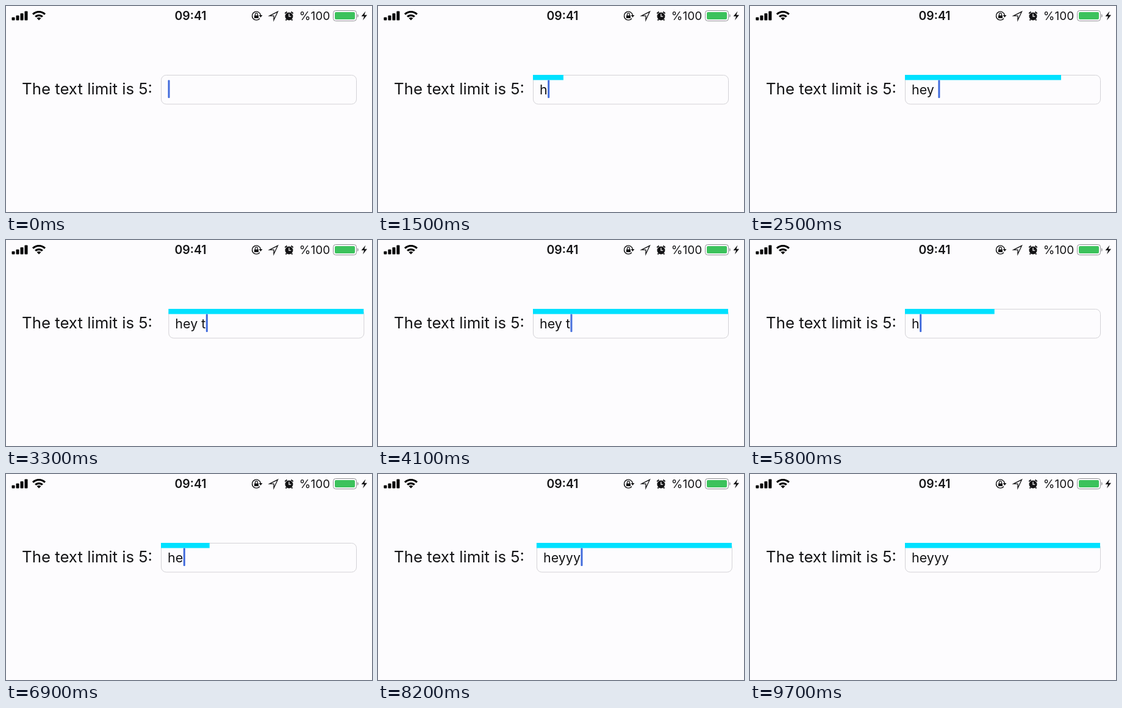
These frames come from a looping animation (600x338 px, 9.8 s). An HTML page with a canvas:

```html
<!DOCTYPE html>
<html lang="en">
<head>
<meta charset="utf-8">
<style>
  html, body { margin: 0; width: 100%; height: 100%; overflow: hidden; background: #fdfcfe; }
  canvas { display: block; }
</style>
</head>
<body>
<canvas id="stage" width="600" height="338"></canvas>
<script>
const ctx = document.getElementById('stage').getContext('2d');
const LOOP = 9800, CHAR_W = 64, GROW = 360;
const BG = '#fdfcfe', INK = '#141416', FAMILY = 'Inter, "Open Sans", sans-serif';

// [time, text after the key press]
const keys = [
  [1250, 'h'], [1600, 'he'], [1950, 'hey'], [2140, 'hey '], [2680, 'hey t'],
  [4480, 'hey '], [4720, 'hey'], [5570, 'he'], [5800, 'h'], [6030, ''],
  [6580, 'h'], [6776, 'he'], [7060, 'hey'], [7320, 'heyy'], [7630, 'heyyy']
];
// Key presses refused because the limit is reached
const refused = [3290, 3620, 8102, 8602, 8802];
const popup = [4780, 5380];

const clamp = x => Math.max(0, Math.min(1, x));
const ease = x => { x = clamp(x); return x * x * (3 - 2 * x); };

function barWidth(t) {
  let width = 0, count = 0;
  for (const [at, text] of keys) {
    width += (text.length - count) * CHAR_W * ease((t - at) / GROW);
    count = text.length;
  }
  return width;
}

function shake(t) {
  const at = refused.filter(x => x <= t).pop();
  const dx = at === undefined ? 0 : 13.5 * Math.exp((at - t) / 120);
  return dx < 0.5 ? 0 : dx;
}

function cursorAlpha(t) {
  const last = Math.max(-400, ...keys.map(k => k[0]).concat(refused).filter(x => x <= t));
  const idle = t - last - 450;
  if (idle < 0) return 1;
  const p = idle % 900;
  return p < 500 ? 1 - ease(p / 250) : ease((p - 500) / 300);
}

function label(text, x, y, size, color = INK, align = 'left', weight = 400) {
  ctx.font = `${weight} ${size}px ${FAMILY}`;
  ctx.textAlign = align;
  ctx.fillStyle = color;
  ctx.fillText(text, x, y);
}

function box(x, y, w, h, r, fill, stroke) {
  ctx.beginPath();
  ctx.roundRect(x, y, w, h, r);
  if (fill) { ctx.fillStyle = fill; ctx.fill(); }
  if (stroke) { ctx.strokeStyle = stroke; ctx.stroke(); }
}

function path(d, fill, stroke, width = 1) {
  const p = new Path2D(d);
  ctx.lineWidth = width;
  if (fill) { ctx.fillStyle = fill; ctx.fill(p); }
  if (stroke) { ctx.strokeStyle = stroke; ctx.stroke(p); }
  ctx.lineWidth = 1;
}

function statusBar() {
  [5, 8, 11.5, 15].forEach((h, i) => box(9.5 + i * 7, 23.5 - h, 5, h, 1, '#000'));

  ctx.strokeStyle = '#000';
  for (const [r, w] of [[2.4, 4.8], [8.2, 3.2], [14, 3.2]]) {
    ctx.lineWidth = w;
    ctx.beginPath();
    ctx.arc(54, 23.5, r, -Math.PI * 0.75, -Math.PI * 0.25);
    ctx.stroke();
  }
  ctx.lineWidth = 1;

  label('09:41', 302.5, 23, 19.5, INK, 'center', 600);

  // Rotation lock
  path('M416 20.5A7 7 0 1 1 417.4 15', null, INK, 1.4);
  path('M414.5 15H420.5L417.5 18.8Z', INK);
  path('M407 15.5H414V20H407Z', INK);
  path('M408.5 16V13.6A2 2 0 0 1 412.5 13.6V16', null, INK, 1.2);

  // Location arrow
  path('M432 16.2L445.5 9.3L439 23V16.2Z', null, INK, 1.3);

  // Alarm clock
  path('M470.5 17A6.5 6.5 0 1 1 457.5 17A6.5 6.5 0 1 1 470.5 17Z', INK);
  path('M457.3 12.2L460.6 9.4M470.7 12.2L467.4 9.4M460 22L458.5 23.5M468 22L469.5 23.5', null, INK, 2);
  path('M464 12.8V17.2H467.3', null, BG, 1.3);

  label('%100', 506, 23, 19, INK, 'center');

  // Battery
  box(536.5, 7.5, 38, 17, 4, null, '#8f8f93');
  box(539, 10, 33, 12, 2, '#3cc25c');
  path('M576 13A3.5 3.5 0 0 1 576 19Z', '#8f8f93');
  path('M589.5 8.5L582.5 17H587L585 23.5L592 14.8H587.5Z', INK);
}

function draw(t) {
  ctx.fillStyle = BG;
  ctx.fillRect(0, 0, 600, 338);
  statusBar();
  label('The text limit is 5:', 26, 145, 25.8);

  const typed = keys.filter(k => k[0] <= t).pop();
  const text = typed ? typed[1] : '';
  ctx.save();
  ctx.translate(shake(t), 0);
  box(254.5, 113.5, 320, 47.5, 8, null, '#d3d2d6');
  ctx.fillStyle = '#00e1ff';
  ctx.fillRect(254, 113, barWidth(t), 8.5);
  label(text, 265, 144.7, 21.5);
  ctx.globalAlpha = cursorAlpha(t);
  box(265.5 + ctx.measureText(text).width, 121.5, 3, 29.5, 1, '#416bdc');
  ctx.restore();

  if (t >= popup[0] && t < popup[1]) {
    box(247, 35, 111, 58, 12, '#545355');
    path('M287 92.5H319L303 107Z', '#545355');
    label('heyet', 302.3, 72, 21.5, '#cfcfd0', 'center');
  }
}

const start = performance.now();
function tick() {
  draw((performance.now() - start) % LOOP);
  requestAnimationFrame(tick);
}
tick();
</script>
</body>
</html>
```
